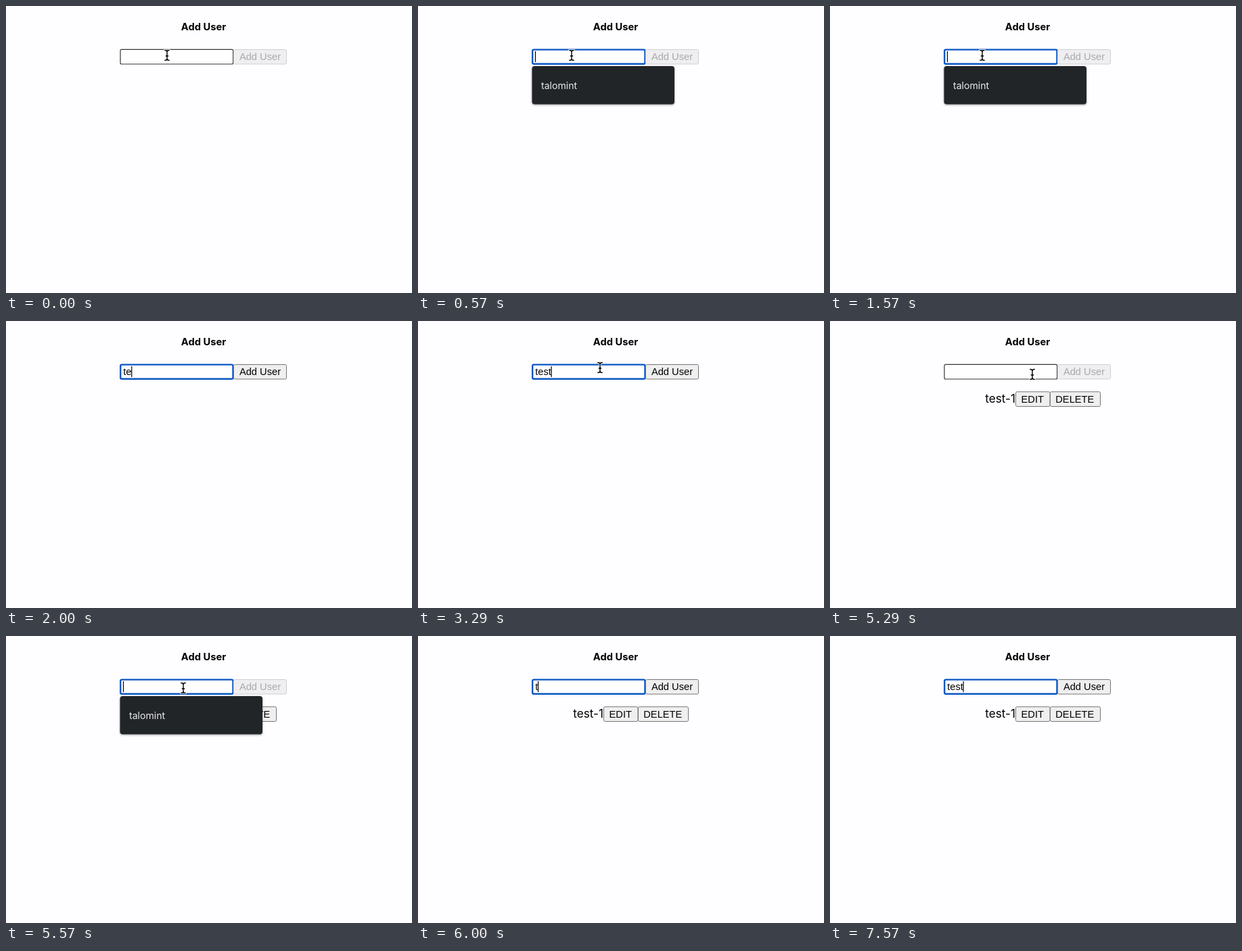
An HTML page for the animation above (8 s loop, 600 by 425 pixels).

```html
<!DOCTYPE html>
<html lang="en">
<head>
<meta charset="utf-8">
<title>Add User</title>
<style>
  html, body { margin: 0; width: 100%; height: 100%; overflow: hidden; background: #fefdff; }
  svg { display: block; width: 600px; height: 425px; }
  text { font: 14.67px "Liberation Sans", Arial, sans-serif; fill: #000; white-space: pre; }
  .title { font: 700 14.7px Inter, sans-serif; }
  .name { font: 17.2px Inter, sans-serif; }
  .hint { font: 14.1px Inter, sans-serif; fill: #e9eaec; }
  .btn rect { fill: #efefef; stroke: #767676; }
  .btn.hover rect { fill: #e5e5e5; stroke: #4f4f4f; }
  .btn.down rect { fill: #f5f5f5; stroke: #8d8d8d; }
  .btn.off rect { fill: #efeef0; stroke: #cfced0; }
  .btn.off text { fill: #a9a8aa; }
  #menu rect { fill: #222528; filter: drop-shadow(0 1px 1.5px rgba(0, 0, 0, .4)); }
</style>
</head>
<body>
<svg viewBox="0 0 600 425">
  <text class="title" x="292" y="36" text-anchor="middle">Add User</text>
  <rect id="field" fill="#fff"/>
  <text id="typed" x="173.2" y="80"></text>
  <rect id="caret" y="67" width="1.2" height="16"/>
  <g id="add" class="btn">
    <rect x="336.5" y="64.5" width="78" height="21.5" rx="2"/>
    <text x="375.5" y="80" text-anchor="middle">Add User</text>
  </g>
  <g id="row">
    <text class="name" x="274" y="120.5" text-anchor="end">test-1</text>
    <g class="btn">
      <rect x="274.5" y="104.8" width="50.5" height="21.7" rx="2"/>
      <text x="299.3" y="120.5" text-anchor="middle">EDIT</text>
    </g>
    <g class="btn">
      <rect x="325.5" y="104.8" width="74" height="21.7" rx="2"/>
      <text x="361.8" y="120.5" text-anchor="middle">DELETE</text>
    </g>
  </g>
  <g id="menu">
    <rect x="168.5" y="89" width="210.5" height="56.5" rx="4"/>
    <text class="hint" x="182" y="122.5">talomint</text>
  </g>
  <g id="beam" fill="none" stroke-linecap="square">
    <path id="stem" stroke="#fff" stroke-width="3.2"
      d="M-3-7.5Q0-7.5 0-5Q0-7.5 3-7.5M0-5V5M-3 7.5Q0 7.5 0 5Q0 7.5 3 7.5M-1.5 1H1.5"/>
    <use href="#stem" style="display:none"/>
    <path stroke="#000" stroke-width="1.4"
      d="M-3-7.5Q0-7.5 0-5Q0-7.5 3-7.5M0-5V5M-3 7.5Q0 7.5 0 5Q0 7.5 3 7.5M-1.5 1H1.5"/>
  </g>
  <path id="arrow" d="M0 0V16L3.7 12.6L6.3 18.6L9 17.4L6.4 11.6H11.4Z"
    fill="#000" stroke="#fff" stroke-width="1.1" stroke-linejoin="round"/>
</svg>
<script>
const LOOP = 8000;
const $ = id => document.getElementById(id);

// Each track holds [start time, value...]; a value lasts until the next entry.
const tracks = {
  pointer: [
    [0, 'beam', 238, 73], [140, 'beam', 235, 73], [290, 'beam', 230, 73],
    [430, 'beam', 227, 73], [710, 'beam', 225, 73], [1710, ''],
    [2710, 'beam', 269, 66], [2860, 'beam', 269, 69], [3570, ''],
    [4000, 'beam', 312, 73], [4140, 'arrow', 372, 75], [4290, 'arrow', 400, 78],
    [5000, 'arrow', 385, 79], [5140, 'arrow', 345, 79], [5290, 'beam', 299, 79],
    [5430, 'beam', 262, 77], [5710, 'beam', 250, 76], [6000, '']
  ],
  text: [
    [0, ''], [1710, 't'], [1860, 'te'], [2140, 'tes'], [2290, 'test'],
    [3570, 'test-'], [3860, 'test-1'], [4570, ''],
    [6000, 't'], [6290, 'te'], [6430, 'tes'], [6570, 'test']
  ],
  focus: [[0, false], [430, true], [4430, false], [5430, true]],
  caret: [
    [0, 1], [1000, 0], [1570, 1], [2710, .4], [2860, 0], [3290, 1],
    [7000, .4], [7140, 0], [7570, 1]
  ],
  menu: [[0, false], [570, true], [1710, false], [5570, true], [6000, false]],
  press: [[0, ''], [4290, 'hover'], [4430, 'down'], [4570, '']],
  row: [[0, false], [4570, true]]
};

const at = (name, t) => tracks[name].findLast(step => step[0] <= t).slice(1);
const show = (id, on) => $(id).style.display = on ? '' : 'none';

function setField(focus, hover) {
  const inset = focus ? 169.2 : 169;
  const top = focus ? 64.6 : 64.3;
  const box = {
    x: inset, y: top, width: 504.7 - 2 * inset, height: 150.3 - 2 * top, rx: 2,
    stroke: focus ? '#0b57c4' : hover ? '#353535' : '#626262',
    'stroke-width': focus ? 2.4 : 1.2
  };
  for (const key in box) $('field').setAttribute(key, box[key]);
}

function draw(t) {
  const [kind, x, y] = at('pointer', t);
  const [text] = at('text', t);
  const [focus] = at('focus', t);
  const [row] = at('row', t);

  setField(focus, kind === 'beam');
  $('typed').textContent = text;
  const end = text ? $('typed').getComputedTextLength() : 0;
  $('caret').setAttribute('x', 172.9 + end);
  $('caret').style.opacity = focus ? at('caret', t)[0] : 0;
  $('add').setAttribute('class', 'btn ' + (text ? at('press', t)[0] : 'off'));
  show('menu', at('menu', t)[0]);
  show('row', row);

  for (const id of ['beam', 'arrow']) {
    show(id, kind === id);
    if (kind === id) $(id).setAttribute('transform', `translate(${x} ${y})`);
  }
}

function tick() {
  draw(performance.now() % LOOP);
  requestAnimationFrame(tick);
}
tick();
</script>
</body>
</html>
```
